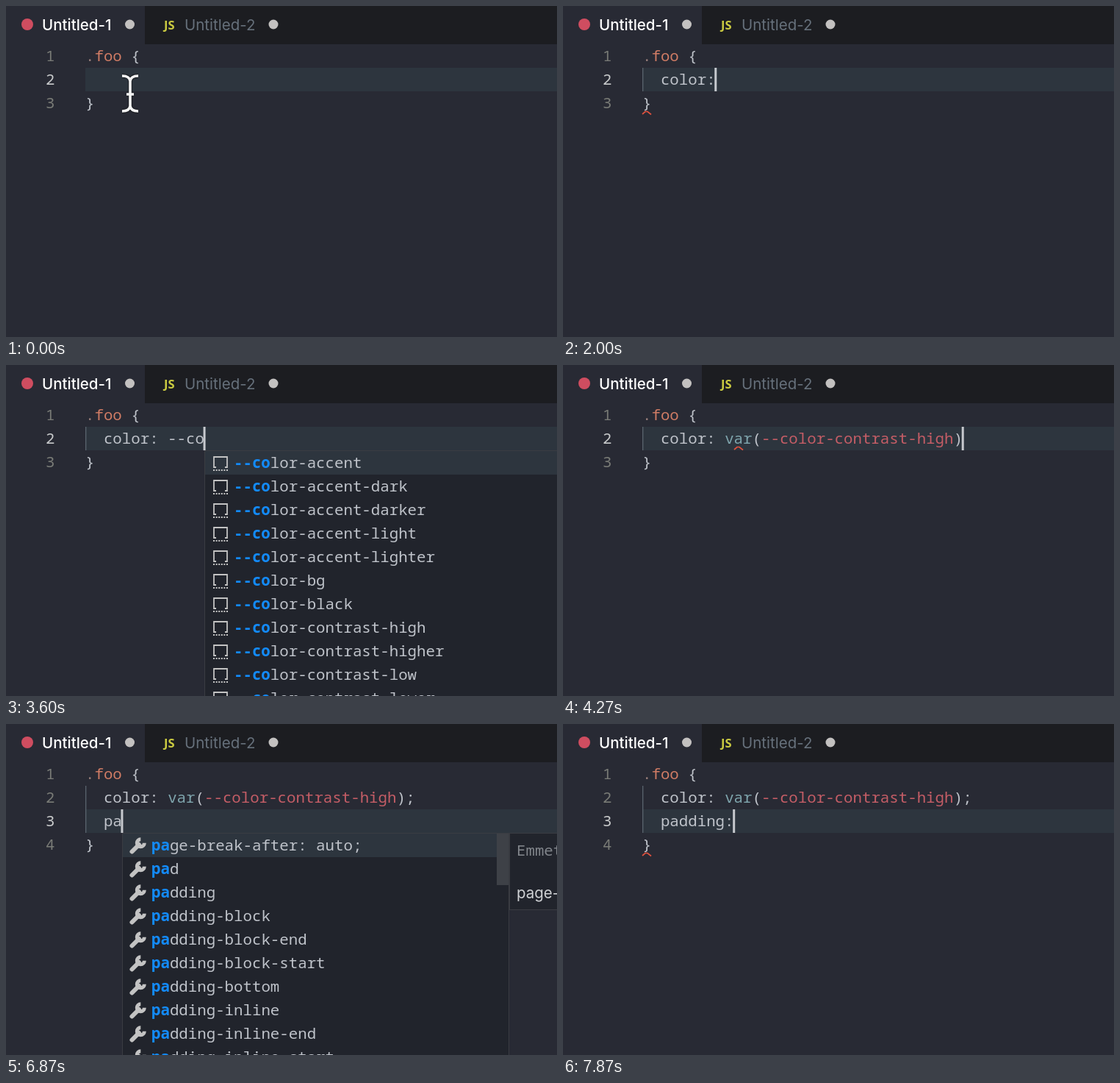
An HTML page with a canvas that plays this animation: 750 by 450 pixels, repeating every 8000 ms.

```html
<!DOCTYPE html>
<html lang="en">
<head>
<meta charset="utf-8">
<title>Editor autocomplete</title>
<style>
  html, body { margin: 0; width: 100%; height: 100%; overflow: hidden; background: #282a34; }
  canvas { display: block; width: 750px; height: 450px; }
</style>
</head>
<body>
<canvas id="stage"></canvas>
<script>
const LOOP = 8000, LEFT = 108, TOP = 52, ROW = 32, CHAR = 12.46, MENU_WIDTH = 527;
const SANS = 'Inter, "Liberation Sans", sans-serif';
const MONO = '"Noto Sans Mono", "DejaVu Sans Mono", monospace';
const color = {
  editor: '#282a34', bar: '#1c1d21', line: '#2d353e', menu: '#21242c', border: '#3a3c42',
  text: '#bfc3ca', orange: '#d07c65', red: '#c45d66', teal: '#7fa5ad', blue: '#138bfa',
  number: '#797b76', active: '#c8cacb', error: '#e0523f', icon: '#c3c3c3'
};

const canvas = document.getElementById('stage');
const scale = window.devicePixelRatio || 1;
canvas.width = 750 * scale;
canvas.height = 450 * scale;
const ctx = canvas.getContext('2d');
ctx.scale(scale, scale);

// Choose the type size that gives the editor's character advance.
ctx.font = `100px ${MONO}`;
const monoSize = CHAR * 100 / ctx.measureText('0').width;

const contrast = ['high', 'higher', 'low', 'lower', 'medium'].map(s => '--color-contrast-' + s);
const accents = ['', '-dark', '-darker', '-light', '-lighter'].map(s => '--color-accent' + s);
const colors = [...accents, '--color-bg', '--color-black', ...contrast];
const columns = ['count', 'fill', 'gap', 'rule', 'rule-color', 'rule-style', 'rule-width', 'span', 'width']
  .map(s => 'column-' + s);
const colorProps = ['color', 'color-adjust', 'color-interpolation-filters'];
const padding = ['', '-block', '-block-end', '-block-start', '-bottom', '-inline', '-inline-end',
  '-inline-start', '-left', '-right', '-top'].map(s => 'padding' + s);

const props = (match, items, thumb = 32) => ({ match, items, thumb });
const vars = (match, items) => ({ match, items, variable: true });
const menus = {
  c: props(/(^c)/, ['color: #000;', 'caption-side', 'caret-color', 'clear', 'clip', 'clip-path',
    'clip-rule', ...colorProps, 'column-count']),
  co: props(/(^co)/, ['counter-reset: ;', ...colorProps, ...columns]),
  col: props(/(^col)/, ['color: #000;', ...colorProps, ...columns]),
  colo: props(/(^colo)/, ['color: #000;', ...colorProps]),
  color: props(/(^color)/, ['color: #000;', ...colorProps]),
  '-': vars(/(^-)/, ['--body-line-height', ...colors]),
  '--': vars(/(^--)/, ['--body-line-height', ...colors]),
  '--c': vars(/(^--c)/, colors),
  '--co': vars(/(^--co)/, colors),
  '--con': vars(/(^--|con)/, [...contrast, '--color-icon']),
  p: props(/(^p)/, ['padding: ;', 'pad', ...padding]),
  pa: props(/(^pa)/, ['page-break-after: auto;', 'pad', ...padding], 70)
};
for (let n = 3; n <= 7; n++) {
  const word = 'padding'.slice(0, n);
  menus[word] = props(new RegExp(`(^${word})`), ['padding: ;', ...padding], 70);
}

// time, line 2, line 3, caret visible, menu, squiggle
const DONE = 'color: var(--color-contrast-high)';
const steps = [
  [0, '', null, 0], [270, '', null, 1], [800, '', null, 0],
  [1130, 'c', null, 1], [1200, 'c', null, 1, 'c'], [1270, 'co', null, 1, 'co'],
  [1330, 'col', null, 1, 'col'], [1470, 'colo', null, 1, 'colo'], [1530, 'color', null, 1, 'color'],
  [1670, 'color', null, 1, 'color', 'brace'], [2000, 'color:', null, 1, '', 'brace'],
  [2270, 'color: ', null, 1, '', 'brace'], [2800, 'color: -', null, 1, '', 'brace'],
  [2870, 'color: -', null, 1, '-', 'brace'], [2930, 'color: --', null, 1, '--', 'brace'],
  [3330, 'color: --c', null, 1, '--c', 'brace'], [3530, 'color: --co', null, 1, '--co', 'brace'],
  [3600, 'color: --co', null, 1, '--co'], [3800, 'color: --con', null, 1, '--con'],
  [4270, DONE, null, 1, '', 'var'], [4730, DONE, null, 0, '', 'var'], [4870, DONE, null, 0],
  [5270, DONE + ';', null, 1], [5730, DONE + ';', null, 0],
  [5870, DONE + ';', '', 1], [6330, DONE + ';', '', 0],
  [6600, DONE + ';', 'p', 1], [6670, DONE + ';', 'p', 1, 'p'], [6800, DONE + ';', 'pa', 1, 'pa'],
  [6930, DONE + ';', 'pad', 1, 'pad'], [7070, DONE + ';', 'padd', 1, 'padd'],
  [7130, DONE + ';', 'paddi', 1, 'paddi'], [7270, DONE + ';', 'paddin', 1, 'paddin'],
  [7400, DONE + ';', 'padding', 1, 'padding'], [7530, DONE + ';', 'padding', 1, 'padding', 'brace'],
  [7870, DONE + ';', 'padding:', 1, '', 'brace']
];

const rowTop = n => TOP + (n - 1) * ROW;
const column = n => LEFT + n * CHAR;

function rect(x, y, w, h, fill) {
  ctx.fillStyle = fill;
  ctx.fillRect(x, y, w, h);
}

function dot(x, y, r, fill) {
  ctx.fillStyle = fill;
  ctx.beginPath();
  ctx.arc(x, y, r, 0, 7);
  ctx.fill();
}

function label(text, x, y, fill, font) {
  ctx.font = font;
  ctx.fillStyle = fill;
  ctx.fillText(text, x, y);
}

// Draws [text, color, weight] runs side by side on the character grid.
function code(runs, x, baseline) {
  for (const [text, fill = color.text, weight = 400] of runs) {
    label(text, x, baseline, fill, `${weight} ${monoSize}px ${MONO}`);
    x += text.length * CHAR;
  }
}

function stroke(path, style, width) {
  ctx.strokeStyle = style;
  ctx.lineWidth = width;
  ctx.stroke(new Path2D(path));
}

function tabs() {
  rect(189, 0, 561, TOP, color.bar);
  dot(29, 25, 8, '#cf4d60');
  label('Untitled-1', 49, 33, '#fff', `500 20.5px ${SANS}`);
  dot(168.5, 25, 6.5, '#c3c1c0');
  label('JS', 215, 31.5, '#cbcb41', '700 16.5px "Open Sans", sans-serif');
  label('Untitled-2', 243, 33, '#66707b', `20.5px ${SANS}`);
  dot(364, 25, 6.5, '#c3c1c0');
}

function squiggle(x, y) {
  stroke(`M${x} ${y + 4}l4-3.5h3l5 4`, color.error, 1.7);
}

function pointer() {
  const shape = 'M158 95Q168 95 169 102Q170 95 180 95M158 143Q168 143 169 136Q170 143 180 143M169 101V137M164 120H174';
  stroke(shape, 'rgba(20,22,26,.6)', 6);
  stroke(shape, '#f4f4f4', 3.6);
}

function wrench(x, y) {
  ctx.save();
  ctx.translate(x, y);
  ctx.lineCap = 'round';
  stroke('M3.5 19.5L13 10', color.icon, 6);
  ctx.lineCap = 'butt';
  stroke('M15.3 2.7A5 5 0 1 0 20.3 7.7', color.icon, 5);
  ctx.restore();
}

// A frame with a dotted bottom edge.
function variableIcon(x, y) {
  stroke(`M${x + 3} ${y + 14}h-3v-14h18v14h-3`, color.icon, 1.8);
  for (let i = 0; i < 6; i++) rect(x - 1 + i * 3.6, y + 17, 2, 2, color.icon);
}

function panel(x, y, w, h) {
  rect(x, y, w, h, color.border);
  rect(x + 1, y + 1, w - 2, h - 2, color.menu);
}

function popup({ match, items, thumb, variable }, x, y) {
  x = Math.round(x);
  panel(x, y, MENU_WIDTH, Math.min(items.length, 12) * ROW + 2);
  rect(x + 1, y + 1, MENU_WIDTH - 2, ROW, color.line);
  items.slice(0, 12).forEach((item, i) => {
    const top = y + 1 + i * ROW;
    if (variable) variableIcon(x + 13, top + 8);
    else wrench(x + 10, top + 5);
    const runs = item.split(match).map((part, j) => j % 2 ? [part, color.blue, 700] : [part]);
    code(runs, x + 40, top + 23);
  });
  if (variable) return;
  rect(x + 510, y + 1, 16, thumb, '#3e4147');
  panel(x + MENU_WIDTH, y, 420, 105);
  code([['Emmet Abbreviation', '#81858b']], x + 537, y + 31);
  label(items[0], x + 537, y + 89, '#d0d2d5', `20.5px ${SANS}`);
}

function declaration(text) {
  const parts = text.match(/^(color: )(var)(\()(.+)(\);?)$/);
  if (!parts) return [[text]];
  const fills = [color.text, color.teal, color.text, color.red, color.text];
  return parts.slice(1).map((part, i) => [part, fills[i]]);
}

function draw(time) {
  const [start, line2, line3, caret, menu, error] = steps.findLast(step => step[0] <= time);
  const activeRow = line3 === null ? 2 : 3;
  const lastRow = activeRow + 1;
  const top = rowTop(activeRow);
  const caretX = column(2 + (line3 ?? line2).length);

  rect(0, 0, 750, 450, color.editor);
  tabs();
  rect(LEFT, top, 642, ROW, color.line);
  if (start >= 1130) rect(LEFT, rowTop(2), 1.3, (activeRow - 1) * ROW, '#59636d');

  for (let n = 1; n <= lastRow; n++) {
    code([[String(n), n === activeRow ? color.active : color.number]], 54, rowTop(n) + 23);
  }
  code([['.', '#9b817c'], ['foo', color.orange], [' {']], LEFT, rowTop(1) + 23);
  code(declaration(line2), column(2), rowTop(2) + 23);
  if (line3) code([[line3]], column(2), rowTop(3) + 23);
  code([['}']], LEFT, rowTop(lastRow) + 23);

  if (error === 'brace') squiggle(LEFT, rowTop(lastRow) + 27);
  if (error === 'var') squiggle(233, rowTop(2) + 27);
  if (menu) popup(menus[menu], caretX, top + ROW);
  if (caret) rect(caretX - 1.4, top, 3, ROW, '#c6c9ce');
  if (start < 1130) pointer();
}

const begin = performance.now();
function tick() {
  draw((performance.now() - begin) % LOOP);
  requestAnimationFrame(tick);
}
tick();
</script>
</body>
</html>
```
